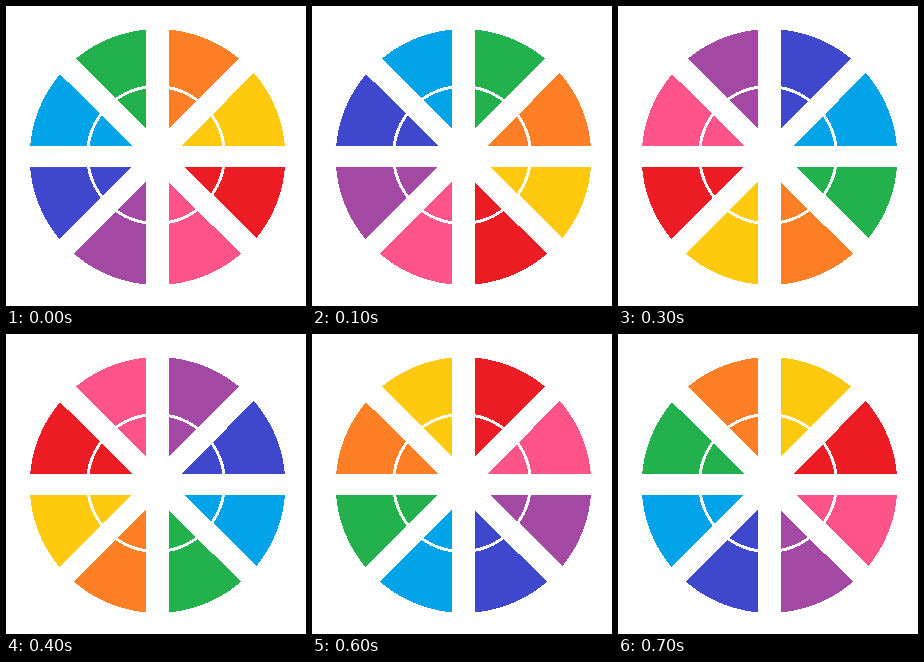
An HTML page with a canvas that plays this animation: 300x300 px, repeating every 0.8 s.

```html
<!DOCTYPE html>
<html lang="en">
<head>
<meta charset="utf-8">
<title>Colour wheel</title>
<style>
  html, body { margin: 0; width: 100%; height: 100%; overflow: hidden; background: #fff; }
  canvas { display: block; }
</style>
</head>
<body>
<canvas id="stage" width="300" height="300"></canvas>
<script>
const SIZE = 300;
const STEP = 100;
const ctx = document.getElementById('stage').getContext('2d');

// Clockwise from the top: orange, yellow, red, pink, purple, indigo, blue, green
const colors = ['ff7f27', 'ffc90e', 'ed1c24', 'ff548a', 'a349a4', '3f48cc', '00a2e8', '22b14c'];
const count = colors.length;

const disc = { x: 151.5, y: 151, r: 127.8 };
const ring = { x: 150, y: 149, r: 68.5, width: 3 };

// White bars between the wedges, each along a line through two points
const bars = [
  { x1: 151.5, y1: 0, x2: 151.5, y2: SIZE, width: 23 },
  { x1: 0, y1: 150.5, x2: SIZE, y2: 150.5, width: 21 },
  { x1: 61.5, y1: 60, x2: 242.75, y2: 240, width: 22 },
  { x1: 240.25, y1: 60, x2: 61, y2: 240, width: 20.7 }
];

const distance = (c, x, y) => Math.hypot(x - c.x, y - c.y);

function onBar({ x1, y1, x2, y2, width }, x, y) {
  const dx = x2 - x1, dy = y2 - y1;
  const offset = Math.abs(dx * (y - y1) - dy * (x - x1)) / Math.hypot(dx, dy);
  return offset < width / 2;
}

// Wedge number at a point, or -1 where the picture is white
function wedgeAt(x, y) {
  if (distance(disc, x, y) > disc.r) return -1;
  if (Math.abs(distance(ring, x, y) - ring.r) < ring.width / 2) return -1;
  if (bars.some(bar => onBar(bar, x, y))) return -1;
  const turn = Math.atan2(y - disc.y, x - disc.x) / (2 * Math.PI) + 1.25;
  return Math.floor(turn * count) % count;
}

// Wedges have hard edges, so each pixel belongs to one of them or to none
const wedgeMap = Array.from({ length: SIZE * SIZE }, (_, i) =>
  wedgeAt(i % SIZE + 0.5, Math.floor(i / SIZE) + 0.5));

const image = ctx.createImageData(SIZE, SIZE);
const rgb = colors.map(hex => [0, 2, 4].map(i => parseInt(hex.slice(i, i + 2), 16)));
const white = [255, 255, 255];

function draw(shift) {
  wedgeMap.forEach((wedge, i) => {
    const color = wedge < 0 ? white : rgb[(wedge - shift + count) % count];
    image.data.set(color, i * 4);
    image.data[i * 4 + 3] = 255;
  });
  ctx.putImageData(image, 0, 0);
}

const start = performance.now();
let shown = -1;

function tick() {
  const shift = Math.floor((performance.now() - start) / STEP) % count;
  if (shift !== shown) draw(shift);
  shown = shift;
  requestAnimationFrame(tick);
}
tick();
</script>
</body>
</html>
```
